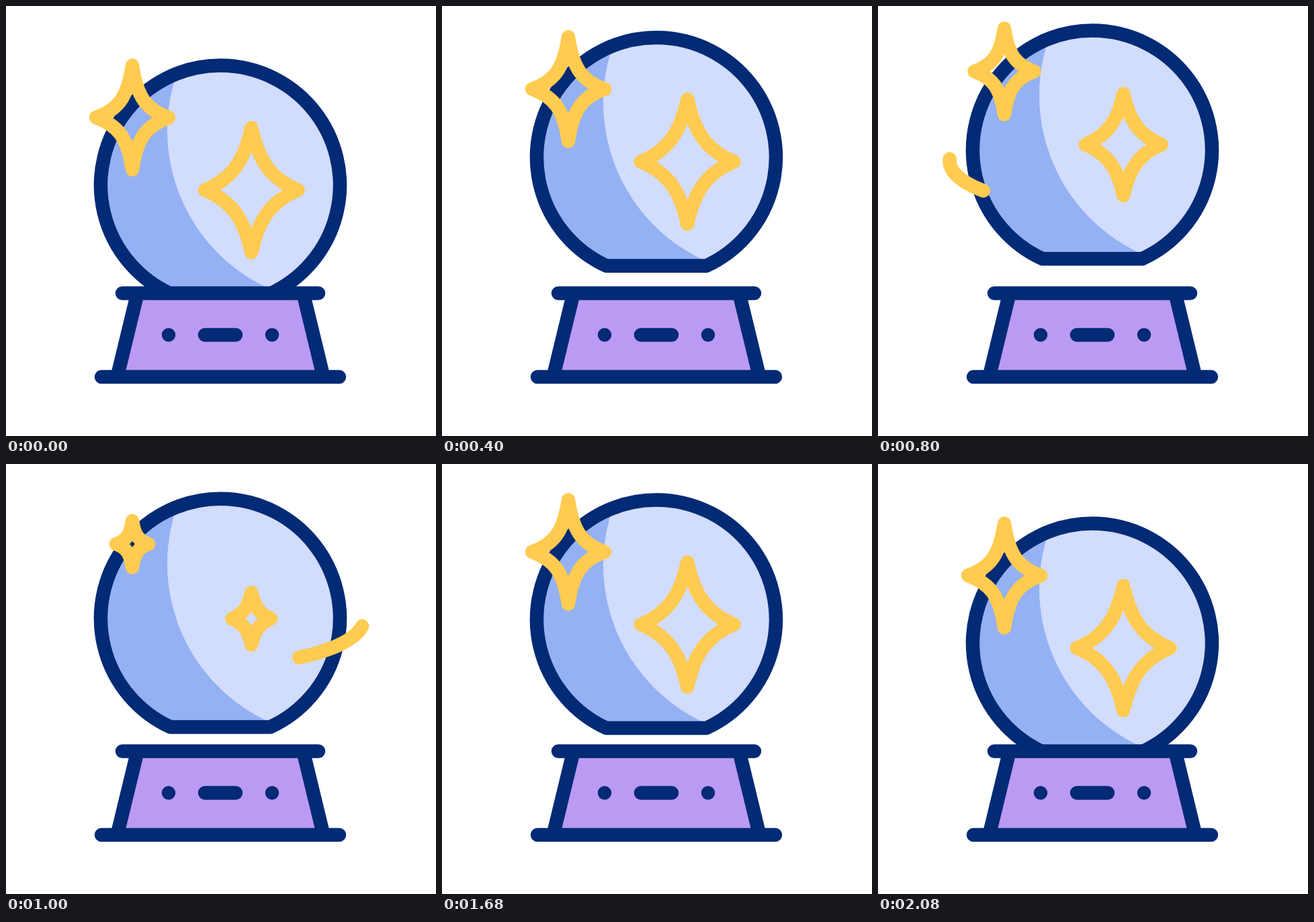
Animation, 640 px wide and 640 px high, one loop 2160 ms. Source, as an HTML page:

```html
<!DOCTYPE html>
<html lang="en">
<head>
<meta charset="utf-8">
<title>Crystal ball</title>
<style>
  html, body { margin: 0; height: 100%; overflow: hidden; background: #fff; }
  svg { display: block; width: 100vw; height: 100vh; }
  .line { fill: none; stroke: #032a75; }
  .gold { fill: none; stroke: #ffcb50; }
</style>
</head>
<body>
<svg viewBox="0 0 640 640" stroke-width="20.5" stroke-linecap="round" stroke-linejoin="round">
  <defs>
    <path id="glass" d="M244.500 428.2A178 178 0 1 1 393.500 428.2Z"/>
    <clipPath id="inside"><use href="#glass"/></clipPath>
  </defs>
  <g id="ball">
    <use href="#glass" fill="#94b1f3"/>
    <circle cx="499" cy="185" r="259" fill="#d2dcfd" clip-path="url(#inside)"/>
    <use href="#glass" class="line"/>
  </g>
  <path d="M195.700 427.5H442.300L472.500 552H165.500Z" fill="#bb9af3"/>
  <path class="line" d="M173 427.5H465M142 552H496M195.700 427.5L165.500 552M442.300 427.5L472.500 552
    M242 489.500h.01M396 489.500h.01M296 489.500H342"/>
  <path id="small" class="gold"/>
  <path id="big" class="gold"/>
  <path id="trail" class="gold"/>
</svg>
<script>
const LOOP = 2160, STEP = 40;
const [ball, small, big, trail] = ['ball', 'small', 'big', 'trail'].map(id => document.getElementById(id));

const progress = (t, from, to) => Math.min(1, Math.max(0, (t - from) / (to - from)));
const smooth = (t, from, to) => {
  const u = progress(t, from, to);
  return u * u * (3 - 2 * u);
};
const cubic = (t, from, to) => {
  const u = progress(t, from, to);
  return u < .5 ? 4 * u ** 3 : 1 - 4 * (1 - u) ** 3;
};

// Four-pointed star with half width w and half height h.
// The handles (ax, ay) and (bx, by) bend each side, as shares of w and h.
function star(cx, cy, w, h, [ax, ay, bx, by]) {
  const at = (x, y) => `${cx + x * w} ${cy + y * h} `;
  const curve = (...p) => 'C' + p.map(([x, y]) => at(x, y)).join('');
  return 'M' + at(0, -1) +
    curve([ax, -ay], [bx, -by], [1, 0]) +
    curve([bx, by], [ax, ay], [0, 1]) +
    curve([-ax, ay], [-bx, by], [-1, 0]) +
    curve([-bx, -by], [-ax, -ay], [0, -1]) + 'Z';
}

// Part of the orbit around the ball, from the left rim across the front to the right.
function orbit(tail, head) {
  const point = k => {
    const a = (200 - 220 * k) * Math.PI / 180;
    return `${319.5 + 213 * Math.cos(a)} ${231 + 68 * Math.sin(a)}`;
  };
  const parts = 40;
  return 'M' + Array.from({ length: parts + 1 }, (_, i) => point(tail + (head - tail) * i / parts)).join('L');
}

function draw(t) {
  const lift = -58.4 * cubic(t, 120, 600) + 22 * cubic(t, 600, 1080) +
    .6 * smooth(t, 1000, 1320) + 35.8 * cubic(t, 1600, 2080);
  const float = -18 * (smooth(t, 360, 680) - smooth(t, 680, 1320));
  const shrink = smooth(t, 680, 1000) - smooth(t, 1000, 1320);
  const y = lift + float;

  ball.setAttribute('transform', `translate(0 ${lift})`);
  small.setAttribute('d', star(188, 166 + y - shrink, 54 - 30 * shrink, 77.5 - 43 * shrink, [.13, .38, .4, .15]));
  big.setAttribute('d', star(365.3, 274 + y + 2 * shrink, 69.3 - 40.5 * shrink, 92.7 - 54 * shrink, [.15, .48, .41, .18]));

  const head = smooth(t, 640, 1105), tail = smooth(t, 720, 1185);
  trail.setAttribute('d', head > tail ? orbit(tail, head) : '');
}

let start;
function tick(now) {
  start ??= now;
  draw(Math.floor(((now - start + 1) % LOOP) / STEP) * STEP);
  requestAnimationFrame(tick);
}
draw(0);
requestAnimationFrame(tick);
</script>
</body>
</html>
```
